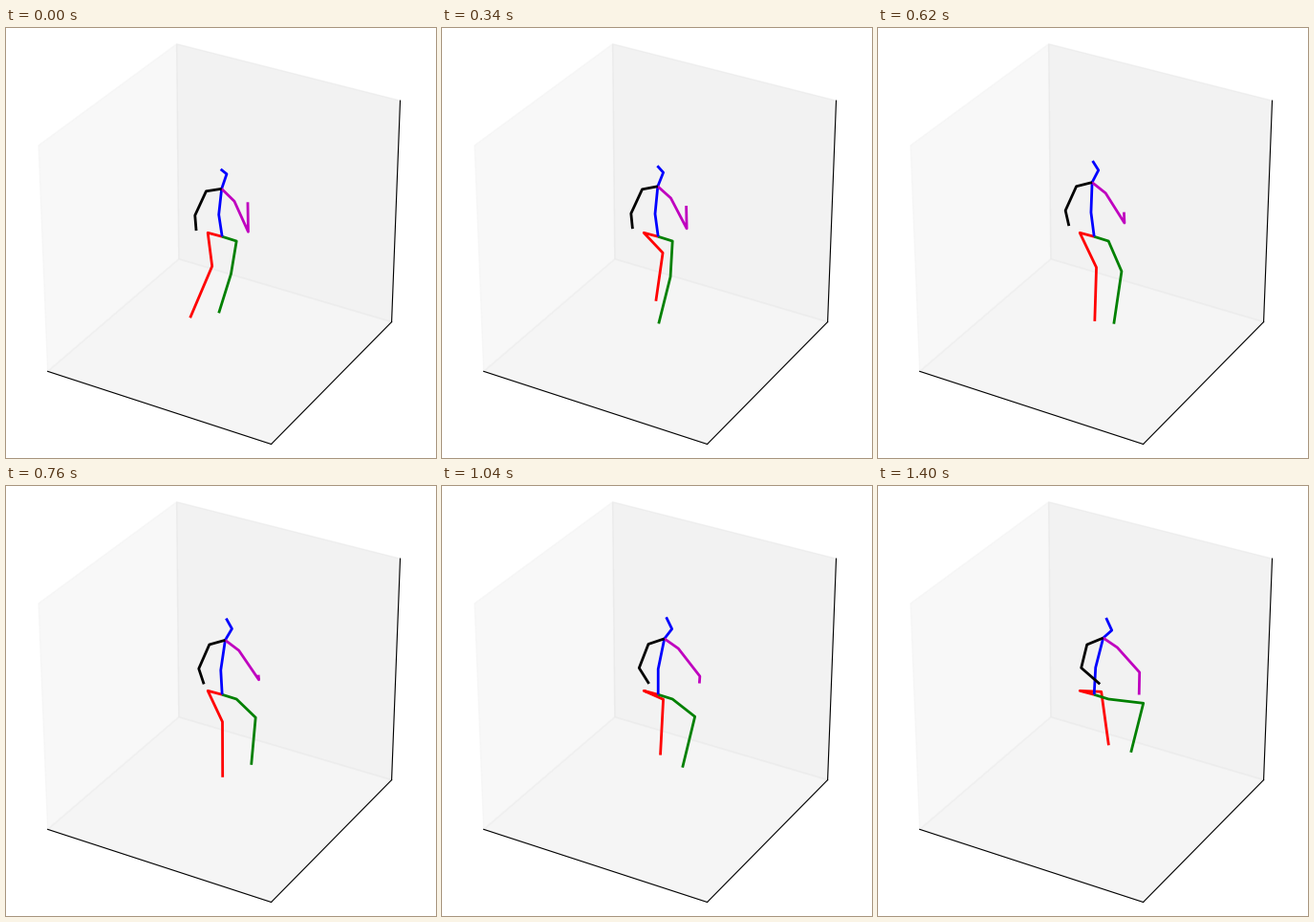
A matplotlib script for the animation above (1.8 s loop, 450 by 450 pixels).

```python
import itertools
import numpy as np
import matplotlib.pyplot as plt
from matplotlib.animation import FuncAnimation
from matplotlib.patches import Polygon

SIZE, DPI = 450, 100
FRAMES, INTERVAL = 90, 20
START, STEPS = 9, 61                      # pause, then 61 moving steps, then hold

# Room: a unit cube in perspective
CENTRE, ZOOM, DISTANCE = np.array([226.4, 219.0]), 2700, 10
ELEV, AZIM = np.radians(30), np.radians(-60)

ROOT = np.array([226.2, 218.3])
STRIDE = np.array([0, 0.13, 0.26, 0.475, 0.61, 1])   # key moments of the steps


def project(point):
    """Stage position of a corner of the room."""
    x, y, z = np.array(point) / 2
    se, ce, sa, ca = np.sin(ELEV), np.cos(ELEV), np.sin(AZIM), np.cos(AZIM)
    ahead = x * ca + y * sa
    right, down = y * ca - x * sa, ahead * se - z * ce
    depth = DISTANCE - ahead * ce - z * se
    return CENTRE + ZOOM * np.array([right, down]) / depth


def ease_in(u):
    return u * u


def ease_out(u):
    return 1 - (1 - u) ** 2


def glide(a, b, u):
    return np.array(a) + (np.array(b) - a) * u


def stride(points, u):
    """Smooth path through one point per key moment (cubic Hermite)."""
    points = np.array(points, dtype=float)
    slopes = np.gradient(points, STRIDE, axis=0)
    i = min(np.searchsorted(STRIDE, u, side="right") - 1, len(STRIDE) - 2)
    span = STRIDE[i + 1] - STRIDE[i]
    s = (u - STRIDE[i]) / span
    return ((1 + 2 * s) * (1 - s) ** 2 * points[i]
            + s * (1 - s) ** 2 * span * slopes[i]
            + s * s * (3 - 2 * s) * points[i + 1]
            + s * s * (s - 1) * span * slopes[i + 1])


def pose(u):
    """Joint chains at progress u; every joint is an offset from its parent."""
    sway = np.exp(-((u - 0.3) / 0.13) ** 2) * np.array([-6.5, -1.5])
    slow, late = ease_out(u), ease_in(u)

    r_hip = ROOT + (-15, -4)
    r_knee = r_hip + stride([(4.5, 35), (19.8, 21), (19.8, 33),
                             (15.3, 32.5), (18.8, 16), (22.5, 1)], u)
    r_foot = r_knee + stride([(-23, 54), (-7.3, 50.5), (-4.8, 54),
                              (0.2, 58), (-3.5, 58.5), (7.7, 56)], u)
    l_hip = ROOT + (15, 4.7)
    l_knee = l_hip + stride([(-5.7, 34.3), (-2.2, 37.3), (6.5, 41.3),
                             (20, 19.3), (21, 20.3), (36.5, 4.3)], u)
    l_foot = l_knee + stride([(-12.8, 41), (-12.3, 49), (-12.5, 58),
                              (-4.5, 49.5), (-10.8, 52.5), (-13, 51.5)], u)

    spine = ROOT + glide((-3.5, -23), (1.5, -28.3), u) + sway * 0.3
    neck = ROOT + glide((-0.5, -50), (9.5, -59.3), (u, slow)) + sway
    face = neck + glide((5.3, -15.5), (9, -8), u)
    crown = face + glide((-6.3, -5), (-6, -13), slow)

    l_shoulder = neck + glide((13.3, 13), (14.7, 10), slow)
    l_elbow = l_shoulder + glide((14.5, 32), (23.3, 26), (slow, late))
    l_hand = l_elbow + glide((-0.5, -31), (-0.5, 23.5), u)
    r_shoulder = neck + glide((-16.2, 2.5), (-17, 7), u)
    r_elbow = r_shoulder + glide((-11.7, 25.3), (-6, 24.3), u * late)
    r_hand = r_elbow + glide((1.3, 16), (19.5, 17), late)

    return [
        [ROOT, r_hip, r_knee, r_foot],
        [ROOT, l_hip, l_knee, l_foot],
        [ROOT, spine, neck, face, crown],
        [neck, l_shoulder, l_elbow, l_hand],
        [neck, r_shoulder, r_elbow, r_hand],
    ]


fig = plt.figure(figsize=(SIZE / DPI, SIZE / DPI), dpi=DPI, facecolor="white")
ax = fig.add_axes([0, 0, 1, 1])
ax.set_xlim(0, SIZE)
ax.set_ylim(SIZE, 0)
ax.axis("off")

corner = {p: project(p) for p in itertools.product((-1, 1), repeat=3)}
for axis, side, grey in [(0, -1, 0.95), (1, 1, 0.90), (2, -1, 0.925)]:
    square = [(-1, -1), (-1, 1), (1, 1), (1, -1)]
    wall = [corner[p[:axis] + (side,) + p[axis:]] for p in square]
    shade = (grey, grey, grey, 0.5)
    ax.add_patch(Polygon(wall, closed=True, linewidth=1,
                         facecolor=shade, edgecolor=shade))

edges = [(-1, -1, -1), (1, -1, -1), (1, 1, -1), (1, 1, 1)]
for a, b in zip(edges, edges[1:]):
    ax.plot(*zip(corner[a], corner[b]), color="k", lw=0.8)

limbs = [ax.plot([], [], color=color, lw=2, solid_capstyle="butt")[0]
         for color in "rgbmk"]


def update(frame):
    u = min(max(frame - START, 0), STEPS) / STEPS
    for limb, joints in zip(limbs, pose(u)):
        limb.set_data(*np.array(joints).T)
    return limbs


anim = FuncAnimation(fig, update, frames=FRAMES, interval=INTERVAL,
                     repeat=True, repeat_delay=0, blit=False)
plt.show()
```
